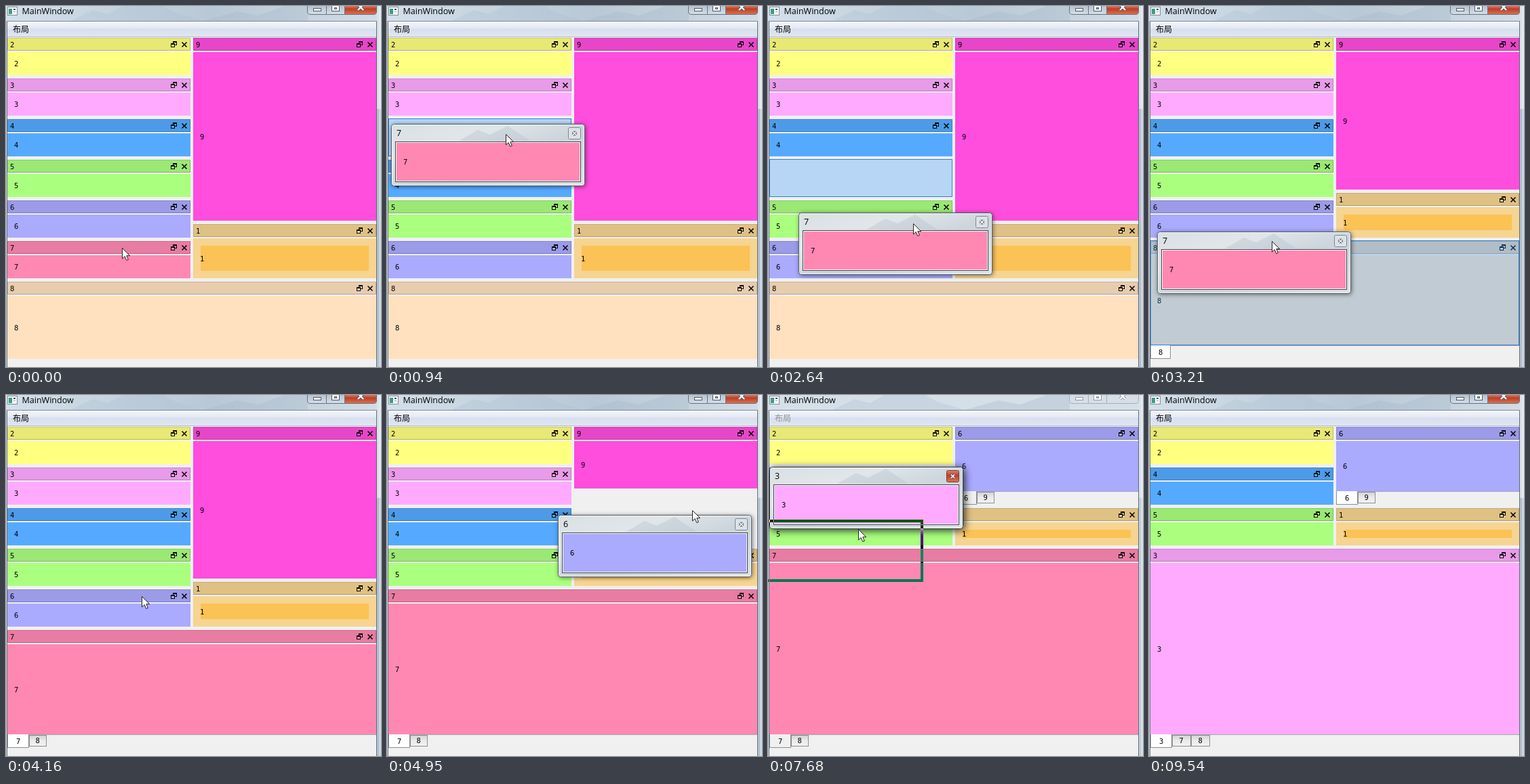
Write an HTML page that moves like this. It is 553x533 px and loops after 9.82 s.

```html
<!DOCTYPE html>
<html lang="zh">
<head>
<meta charset="utf-8">
<title>MainWindow</title>
<style>
html, body { margin: 0; width: 100%; height: 100%; overflow: hidden; background: #f0f0f0; }
svg { display: block; width: 553px; height: 533px; }
rect, line { shape-rendering: crispEdges; }
.soft { shape-rendering: auto; }
.d { font: 10.5px "DejaVu Sans Mono", monospace; }
.t { font: 12.5px "Open Sans", sans-serif; }
.m { font: 12px "Noto Sans CJK SC", "Noto Sans CJK", sans-serif; }
.float { filter: drop-shadow(1px 1px 3px rgba(0,0,0,.5)); }
.float.on { filter: drop-shadow(2px 2px 6px rgba(0,0,0,.8)); }
.band { mix-blend-mode: difference; fill: none; stroke: #fff; stroke-width: 4; }
</style>
</head>
<body>
<svg viewBox="0 0 553 533" xmlns="http://www.w3.org/2000/svg">
  <defs>
    <linearGradient id="bar" x2="1"><stop stop-color="#d3dfea"/><stop offset=".2" stop-color="#c9d7e3"/><stop offset=".55" stop-color="#b9c8d6"/><stop offset="1" stop-color="#d2dce6"/></linearGradient>
    <linearGradient id="menu" x2="0" y2="1"><stop stop-color="#f4f6fb"/><stop offset=".45" stop-color="#e3e8f3"/><stop offset=".5" stop-color="#d7deed"/><stop offset="1" stop-color="#e0e6f3"/></linearGradient>
    <linearGradient id="btn" x2="0" y2="1"><stop stop-color="#b4c1ce"/><stop offset="1" stop-color="#d5dee7"/></linearGradient>
    <linearGradient id="red" x2="0" y2="1"><stop stop-color="#d98a78"/><stop offset=".4" stop-color="#bd3f29"/><stop offset="1" stop-color="#d9744f"/></linearGradient>
    <linearGradient id="glass" x2="1" y2="1"><stop stop-color="#d9e0e4"/><stop offset=".3" stop-color="#e1e6e9"/><stop offset=".55" stop-color="#cbd5dc"/><stop offset="1" stop-color="#dde4e9"/></linearGradient>
    <linearGradient id="tab" x2="0" y2="1"><stop stop-color="#d2d2d2"/><stop offset=".5" stop-color="#ebebeb"/><stop offset="1" stop-color="#f2f2f2"/></linearGradient>
  </defs>
  <g id="stage"></g>
</svg>
<script>
const LOOP = 9820;
const stage = document.getElementById('stage');

// Bursts of screen refreshes: first, last, count.
const bursts = [[130, 1090, 8], [1250, 2120, 7], [2400, 3210, 7], [3740, 4650, 7], [4800, 5260, 4],
  [5680, 6620, 8], [6770, 7680, 7], [7830, 8580, 6], [8880, 9000, 2], [9270, 9540, 3]];
const ticks = [0];
for (const [a, b, n] of bursts)
  for (let i = 0; i < n; i++) ticks.push(Math.floor((a + (b - a) * i / (n - 1)) / 10) * 10);

const fills = { 1: '#f6d491', 2: '#ffff80', 3: '#ffaaff', 4: '#55aaff', 5: '#aaff7f',
  6: '#aaaaff', 7: '#ff88b2', 8: '#ffe0bf', 9: '#ff4ddd' };

// time, left column (_ = gap), upper right, bottom, floating dock, hovered area, floating active
const scenes = [
  [0, '234567', '9', '8'],
  [260, '23456_', '9', '8', 7],
  [400, '2345_6', '9', '8', 7],
  [540, '234_56', '9', '8', 7],
  [670, '23_456', '9', '8', 7],
  [1390, '234_56', '9', '8', 7],
  [1540, '2345_6', '9', '8', 7],
  [1680, '23456', '9', '8', 7, 'b'],
  [2530, '234_56', '9', '8', 7],
  [2670, '23_456', '9', '8', 7],
  [2940, '2345_6', '9', '8', 7],
  [3070, '23456', '9', '8', 7, 'b'],
  [3740, '23456', '9', '78'],
  [4190, '2345_', '9', '78', 6],
  [4340, '234_5', '9', '78', 6],
  [4490, '23_45', '9', '78', 6],
  [4800, '2345', '9_', '78', 6],
  [5100, '2345', '9', '78', 6, 'r'],
  [5680, '2345', '69', '78'],
  [6210, '2_45', '69', '78', 3],
  [6480, '245', '69', '78', 3],
  [6770, '245', '69', '78', 3, '', true],
  [8130, '245', '69', '78', 3, 'b', true],
  [8280, '245', '69', '378']
];

const cursorPath = [[0, 171, 357], [260, 171, 350], [670, 172, 176], [1090, 180, 215], [1250, 185, 230],
  [1830, 238, 471], [2120, 245, 482], [2400, 240, 440], [2670, 185, 192], [2940, 176, 250], [3210, 181, 347],
  [3740, 181, 347], [4040, 200, 297], [4190, 200, 297], [4490, 230, 170], [4650, 300, 175], [4950, 450, 170],
  [5260, 460, 100], [5680, 460, 100], [5940, 232, 138], [6080, 190, 117], [6210, 190, 117], [6350, 208, 234],
  [6620, 191, 120], [7370, 191, 120], [7680, 133, 198], [7980, 180, 400], [8130, 200, 420], [8580, 242, 349],
  [8880, 258, 377], [9000, 266, 362], [9270, 350, 335], [9400, 444, 300]];

const floatPath = [[260, 2, 338], [670, 3, 162], [1090, 11, 199], [1250, 16, 212], [1830, 69, 449], [2120, 76, 465],
  [2400, 71, 425], [2670, 16, 176], [2940, 7, 236], [3210, 12, 333], [3740, 12, 333], [4190, 2, 285],
  [4490, 32, 158], [4650, 95, 166], [4950, 252, 177], [5260, 262, 86], [5680, 262, 86], [6210, 2, 103],
  [6350, 20, 220], [6620, 2, 106], [7980, 2, 106], [8130, 10, 406]];

function along(path, t) {
  let i = path.findIndex(p => p[0] > t);
  if (i < 0) return path[path.length - 1].slice(1);
  if (i === 0) return path[0].slice(1);
  const a = path[i - 1], b = path[i], k = (t - a[0]) / (b[0] - a[0]);
  return [1, 2].map(j => Math.round(a[j] + (b[j] - a[j]) * k));
}

const rect = (x, y, w, h, fill, more = '') => `<rect x="${x}" y="${y}" width="${w}" height="${h}" fill="${fill}" ${more}/>`;
const box = (x, y, w, h, fill, stroke, more = '') => rect(x + .5, y + .5, w - 1, h - 1, fill, `stroke="${stroke}" ${more}`);
const path = (d, fill, more = '') => `<path d="${d}" fill="${fill}" ${more}/>`;
const text = (cls, x, y, s, more = '') => `<text class="${cls}" x="${x}" y="${y}" ${more}>${s}</text>`;

function mainFrame(off) {
  const ink = off ? '#8d98a5' : '#4c5866';
  let s = rect(0, 0, 553, 533, '#f0f0f0') + rect(0, 0, 553, 23, off ? '#d5dfe8' : 'url(#bar)');
  s += path('M95 22L128 6L150 12L172 0H232L250 10L290 22Z', '#a9bccc', 'opacity=".3"');
  s += path('M290 22L340 8L372 14L410 0H445V22Z', '#9fb2c4', 'opacity=".3"');
  s += rect(547, 0, 6, 152, '#dbe3eb') + rect(547, 152, 6, 381, off ? '#c5cfda' : '#b5c3d1');
  s += rect(0, 23, 1, 510, '#d5dee7') + rect(1, 22, 1, 511, '#626c77') + rect(546, 22, 1, 511, '#626c77');
  s += rect(1, 22, 546, 1, '#7d8995') + rect(551, 0, 1, 533, '#eef3f7');
  s += box(2, 1, 15, 13, '#f7f9fa', '#7d8b96') + rect(4, 4, 5, 8, '#3f9c84') + rect(11, 4, 3, 2, '#456') + rect(11, 8, 3, 1, '#9ab');
  s += text('t', 23.5, 12, 'MainWindow');
  const edge = `class="soft" stroke="${off ? '#a3afbb' : '#647282'}"`;
  s += path('M444.5 -1V8Q444.5 12.5 449 12.5H472.5V-1Z', off ? '#d6dfe8' : 'url(#btn)', edge);
  s += path('M472.5 -1V12.5H499.5V-1Z', off ? '#d6dfe8' : 'url(#btn)', edge);
  s += path('M499.5 -1V12.5H542Q546.5 12.5 546.5 8V-1Z', off ? '#d6dfe8' : 'url(#red)', edge);
  s += box(453, 3, 12, 5, '#fff', ink) + box(480, -1, 12, 9, '#fff', ink) + box(484, 2, 4, 3, '#b7c4d0', ink);
  s += path('M519 -2L527 6M527 -2L519 6', 'none', `stroke="${ink}" stroke-width="4"`) +
    path('M519 -2L527 6M527 -2L519 6', 'none', 'stroke="#fff" stroke-width="2.3"');
  s += rect(2, 23, 544, 22, 'url(#menu)') + rect(2, 45, 544, 1, '#b6bccc');
  return s + text('m', 10, 39, '布局', off ? 'fill="#909090"' : '');
}

function dock(id, x, w, y, end) {
  const r = x + w, top = y + 21;
  let s = rect(x, y, w, 19, fills[id]) + box(x, y, w, 19, 'rgba(0,0,0,.09)', 'rgba(0,0,0,.2)');
  s += rect(x, top, w, end - top, fills[id]);
  if (id == 1) s += rect(x + 11, top + 11, w - 22, end - top - 22, '#fbc255');
  s += text('d', x + 4, y + 14, id) + text('d', x + 10, (top + end) / 2 + 4, id);
  // float and close glyphs
  s += box(r - 26, y + 5, 6, 6, 'none', '#000') + rect(r - 26, y + 5, 6, 2, '#000');
  s += box(r - 29, y + 8, 6, 6, fills[id], '#000') + rect(r - 29, y + 8, 6, 2, '#000');
  return s + path(`M${r - 12.5} ${y + 6.5}l7 7m0 -7l-7 7`, 'none', 'stroke="#000" stroke-width="1.5"');
}

function tabs(ids, x, y, w, off) {
  let s = rect(x, y, w, 1, '#a9a9a9');
  const single = ids.length < 2, side = ids.length > 2 ? 28 : 26;
  [...ids].forEach((id, i) => {
    const tw = i ? side : single ? 30 : 32;
    const tx = i ? x + 32 + (i - 1) * side : x;
    s += i ? box(tx, y + 1, tw, 17, 'url(#tab)', '#8c8e94') : box(tx, y, tw, 20, off ? '#f0f0f0' : '#fff', '#8c8e94');
    if (!i) s += rect(tx + 1, y, tw - 2, 1, off ? '#f0f0f0' : '#fff');
    s += text('d', tx + tw / 2 - 4.5 + (i ? 0 : 0.5) + 1, y + (i ? 13 : 14), id);
  });
  return s;
}

const glow = (x, y, w, h) => box(x, y, w, h, 'rgba(51,153,255,.3)', '#2f80cf');

function layout([, left, right, bottom, , hover, off]) {
  const n = left.length, foot = 47 + 60 * n;
  let s = '';
  [...left].forEach((id, i) => {
    const y = 47 + 60 * i;
    s += id === '_' ? glow(2, y - 1, 270, 56) : dock(id, 2, 270, y, y + 55);
  });
  const end = { 6: 317, 5: 271, 4: 222, 3: 162 }[n];
  const tabbed = right.length > 1 && right[1] !== '_' || hover === 'r';
  const rightEnd = tabbed ? end - 20 : right[1] === '_' ? 138 : end;
  s += dock(right[0], 276, 270, 47, rightEnd);
  if (tabbed) s += tabs(right, 276, rightEnd, 270, off);
  if (hover === 'r') s += glow(276, 46, 270, rightEnd - 45);
  s += dock(1, 276, 270, end + 5, foot - 5);
  const stacked = bottom.length > 1 || hover === 'b', base = stacked ? 501 : 521;
  s += dock(bottom[0], 2, 544, foot, base);
  if (stacked) s += tabs(bottom, 2, 501, 544, off);
  if (hover === 'b') s += glow(2, foot - 1, 544, 502 - foot);
  return s;
}

function floating(id, [x, y], on) {
  let s = `<g class="float${on ? ' on' : ''}" transform="translate(${x} ${y})">`;
  s += box(0, 0, 286, 92, 'url(#glass)', on ? '#30363c' : '#555e66', 'class="soft" rx="4"');
  s += box(1, 1, 284, 90, 'none', 'rgba(255,255,255,.65)', 'class="soft" rx="3"');
  s += path('M100 25L128 9L146 16L172 3L205 25Z', '#aebcc8', 'opacity=".35"');
  s += text('t', 8, 18, id);
  s += box(261, 5, 19, 18, on ? 'url(#red)' : '#dce3e8', on ? '#7e3a30' : '#7c8791', 'class="soft" rx="2"');
  const cross = 'M268 11.5l5 5m0 -5l-5 5';
  s += path(cross, 'none', 'stroke="#4e5862" stroke-width="3.6"') + path(cross, 'none', 'stroke="#fff" stroke-width="1.7"');
  s += box(6, 26, 274, 60, '#fff', '#3d4247') + rect(8, 28, 270, 56, fills[id]);
  return s + text('d', 18, 60, id) + '</g>';
}

const arrow = ([x, y]) => path('M.5 .5V16L4.2 12.6L6.8 18.5L9.3 17.4L6.8 11.7H11.7Z', '#fff',
  `stroke="#222" transform="translate(${x} ${y})"`);

function draw(t) {
  const scene = scenes.filter(c => c[0] <= t).pop();
  const cur = along(cursorPath, t);
  let s = mainFrame(scene[6]) + layout(scene);
  if (scene[4]) s += floating(scene[4], along(floatPath, t), scene[6]);
  if (t >= 7520 && t < 8130) s += `<rect class="band" x="${cur[0] - 188}" y="${cur[1] - 12}" width="282" height="88"/>`;
  if (t < 9540) s += arrow(cur);
  stage.innerHTML = s;
}

let shown = -1;
function loop() {
  const now = performance.now() % LOOP;
  const tick = ticks.filter(v => v <= now).pop();
  if (tick !== shown) draw(shown = tick);
  requestAnimationFrame(loop);
}
loop();
</script>
</body>
</html>
```
